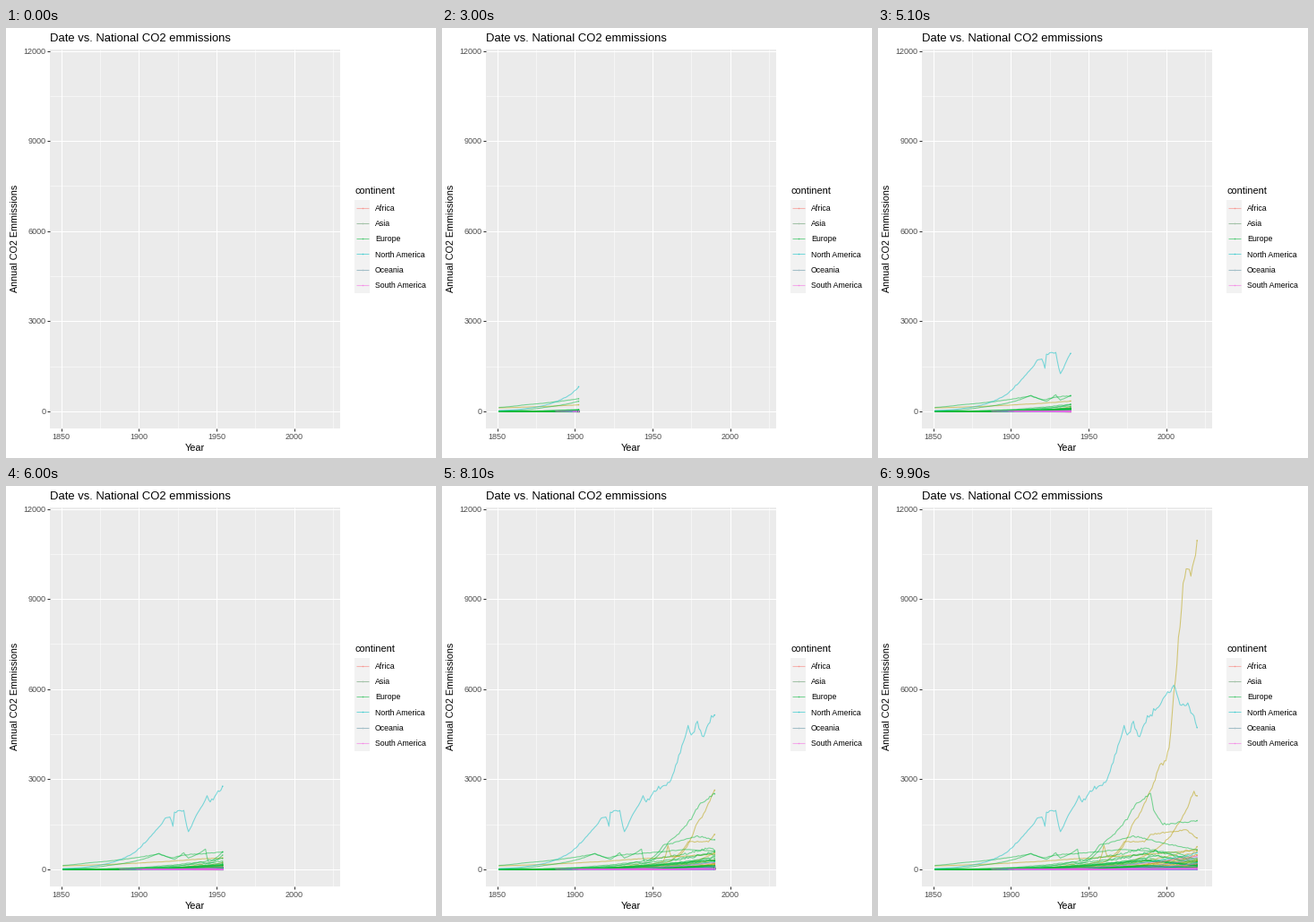
A matplotlib script for the animation above (10 s loop, 480 by 480 pixels).

```python
import numpy as np
import matplotlib
import matplotlib.pyplot as plt
from matplotlib.animation import FuncAnimation
from matplotlib.collections import LineCollection
from matplotlib.patches import Rectangle

matplotlib.rcParams["font.family"] = "Liberation Sans"

FRAMES, STEP = 100, 100
FIRST, LAST, DATA_END = 1851, 2021, 2020
LEFT, RIGHT, TOP, BOTTOM = 49, 373, 24.2, 446.9
PT = 0.72  # points per pixel at 100 dpi

HUES = {
    "Africa": "#F8766D",
    "Asia": "#B79F00",
    "Europe": "#00BA38",
    "North America": "#00BFC4",
    "Oceania": "#619CFF",
    "South America": "#F564E3",
}
KEY_TINTS = {"Asia": "#A3C2A8", "Oceania": "#A3BFC8"}

# Small emitters: count, earliest and latest start, typical size, large ones, their top
MINOR = {
    "Africa": (48, 1895, 1960, 9, 2, 450),
    "Asia": (34, 1890, 1955, 45, 5, 700),
    "Europe": (36, 1815, 1905, 35, 6, 700),
    "North America": (18, 1890, 1960, 7, 2, 535),
    "Oceania": (12, 1900, 1960, 3, 1, 390),
    "South America": (9, 1885, 1950, 14, 2, 445),
}

rng = np.random.default_rng(12)


def px(year):
    return 61.5 + (np.asarray(year) - 1850) * 1.7335


def py(value):
    return 427.8 - np.asarray(value) * 0.033518


def growth(*knots):
    """Yearly values with steady percentage growth between (year, value) knots."""
    at, level = np.array(knots).T
    years = np.arange(at[0], DATA_END + 1)
    values = np.exp(np.interp(years, at, np.log(level)))
    jitter = 1 + 0.012 * rng.standard_normal(len(years))
    return years, values * np.where(np.isin(years, at), 1, jitter)


def leaders():
    return {
        "Asia": [
            growth((1851, 110), (1939, 340), (2020, 640)),
            growth((1903, 2), (1940, 100), (1957, 260), (1960, 800), (1962, 440),
                   (1967, 430), (1978, 1460), (1996, 3480), (2000, 3610),
                   (2002, 4050), (2005, 5880), (2011, 9530), (2014, 10000),
                   (2016, 9760), (2020, 10950)),
            growth((1870, 1), (1940, 170), (1946, 60), (1973, 915), (1986, 910),
                   (1990, 1160), (2013, 1315), (2020, 1040)),
            growth((1900, 15), (1970, 180), (2018, 2600), (2020, 2445)),
        ],
        "Europe": [
            growth((1851, 123), (1868, 215), (1913, 510), (1921, 380),
                   (1929, 470), (1971, 660), (2007, 555), (2020, 330)),
            growth((1851, 12), (1880, 125), (1913, 530), (1923, 330), (1929, 550),
                   (1932, 370), (1943, 670), (1945, 230), (1957, 800),
                   (1979, 1115), (2020, 650)),
            growth((1880, 12), (1940, 240), (1945, 180), (1960, 880), (1980, 2130),
                   (1990, 2530), (1992, 1970), (1998, 1480), (2020, 1620)),
        ],
        "North America": [
            growth((1851, 20), (1870, 100), (1907, 1060), (1917, 1700), (1920, 1740),
                   (1922, 1430), (1923, 1900), (1929, 1960), (1932, 1250),
                   (1937, 1790), (1944, 2450), (1946, 2240), (1951, 2610),
                   (1961, 2890), (1973, 4790), (1975, 4470), (1979, 4930),
                   (1982, 4440), (1990, 5140), (2005, 6130), (2009, 5480),
                   (2014, 5540), (2020, 4715)),
        ],
    }


def minor(name, peak, power):
    _, early, late, *_ = MINOR[name]
    years = np.arange(max(FIRST, rng.integers(early, late)), DATA_END + 1)
    t = np.linspace(0, 1, len(years))
    if name == "Europe":
        shape = np.minimum(t / 0.8, 1) ** power * (1 - 3 * np.maximum(t - 0.8, 0))
    else:
        shape = t ** power
    return years, peak * shape * (1 + 0.04 * rng.standard_normal(len(years)))


def build_series():
    main = leaders()
    out = []
    for name, hue in HUES.items():
        count, _, _, size, large, top = MINOR[name]
        group = list(main.get(name, []))
        group += [minor(name, p, 2.5) for p in np.linspace(top, top * 0.4, large)]
        for _ in range(count):
            peak = min(size * rng.lognormal(0, 1.1), 300)
            group.append(minor(name, peak, rng.uniform(1.5, 3.5)))
        out += [(*s, hue) for s in group]
    return out


fig = plt.figure(figsize=(4.8, 4.8), dpi=100, facecolor="white")
ax = fig.add_axes([0, 0, 1, 1])
ax.set_xlim(0, 480)
ax.set_ylim(480, 0)
ax.axis("off")


def label(x, y, s, size, color="black", **kw):
    ax.text(x, y, s, fontsize=size * PT, color=color, va="baseline", **kw)


def rule(x, y, color, width, **kw):
    ax.plot(x, y, color=color, lw=width * PT, solid_capstyle="butt", **kw)


def box(x, y, w, h, color):
    ax.add_patch(Rectangle((x, y), w, h, fc=color, ec="none", zorder=0))


def draw_panel():
    box(LEFT, TOP, RIGHT - LEFT, BOTTOM - TOP, "#EBEBEB")
    for year in range(1875, 2026, 50):
        rule([px(year)] * 2, [TOP, BOTTOM], "white", 0.53)
    for value in range(1500, 12000, 3000):
        rule([LEFT, RIGHT], [py(value)] * 2, "white", 0.53)
    for year in range(1850, 2001, 50):
        x = px(year)
        rule([x, x], [TOP, BOTTOM], "white", 1.07)
        rule([x, x], [BOTTOM, BOTTOM + 2.75], "#333333", 1.07)
        label(x, 459.2, str(year), 9, "#4D4D4D", ha="center")
    for value in range(0, 12001, 3000):
        y = py(value)
        rule([LEFT, RIGHT], [y, y], "white", 1.07)
        rule([LEFT - 2.75, LEFT], [y, y], "#333333", 1.07)
        label(44.2, y + 3.2, str(value), 9, "#4D4D4D", ha="right")
    label(49, 15.2, "Date vs. National CO2 emmissions", 13)
    label(211, 472, "Year", 11, ha="center")
    label(13, 235.3, "Annual CO2 Emmissions", 10.7, ha="center",
          rotation=90, rotation_mode="anchor")


def draw_legend():
    label(389, 185, "continent", 11)
    for i, (name, hue) in enumerate(HUES.items()):
        y = 200.6 + 17.28 * i
        box(389, y - 8.64, 17.28, 17.28, "#F2F2F2")
        tint, alpha = KEY_TINTS.get(name, hue), 1 if name in KEY_TINTS else 0.5
        rule([390.7, 404.8], [y, y], tint, 1.07, alpha=alpha)
        ax.plot([397.7], [y], "o", ms=1.6 * PT, mew=0, color=tint, alpha=alpha)
        label(412, y + 3.2, name, 8.8)


draw_panel()
draw_legend()

series = build_series()
colors = [hue for *_, hue in series]
lines = LineCollection([], colors=colors, linewidths=1.07 * PT, alpha=0.5, zorder=5)
ax.add_collection(lines)
heads = ax.scatter([], [], s=(1.6 * PT) ** 2, linewidths=0, alpha=0.5, zorder=6)


def trace(years, values, now):
    seen = years < now
    end = min(now, years[-1])
    xs = np.append(years[seen], end)
    ys = np.append(values[seen], np.interp(end, years, values))
    return np.column_stack([px(xs), py(ys)])


def update(i):
    now = FIRST + (LAST - FIRST) * i / (FRAMES - 1)
    paths, tips, tip_colors = [], [], []
    for years, values, hue in series:
        if i == 0 or now <= years[0]:
            paths.append(np.empty((0, 2)))
            continue
        path = trace(years, values, now)
        paths.append(path)
        tips.append(path[-1])
        tip_colors.append(hue)
    lines.set_segments(paths)
    heads.set_offsets(np.array(tips) if tips else np.empty((0, 2)))
    heads.set_facecolor(tip_colors)
    return lines, heads


anim = FuncAnimation(fig, update, frames=FRAMES, interval=STEP, repeat=True,
                     repeat_delay=0, blit=False)
plt.show()
```
